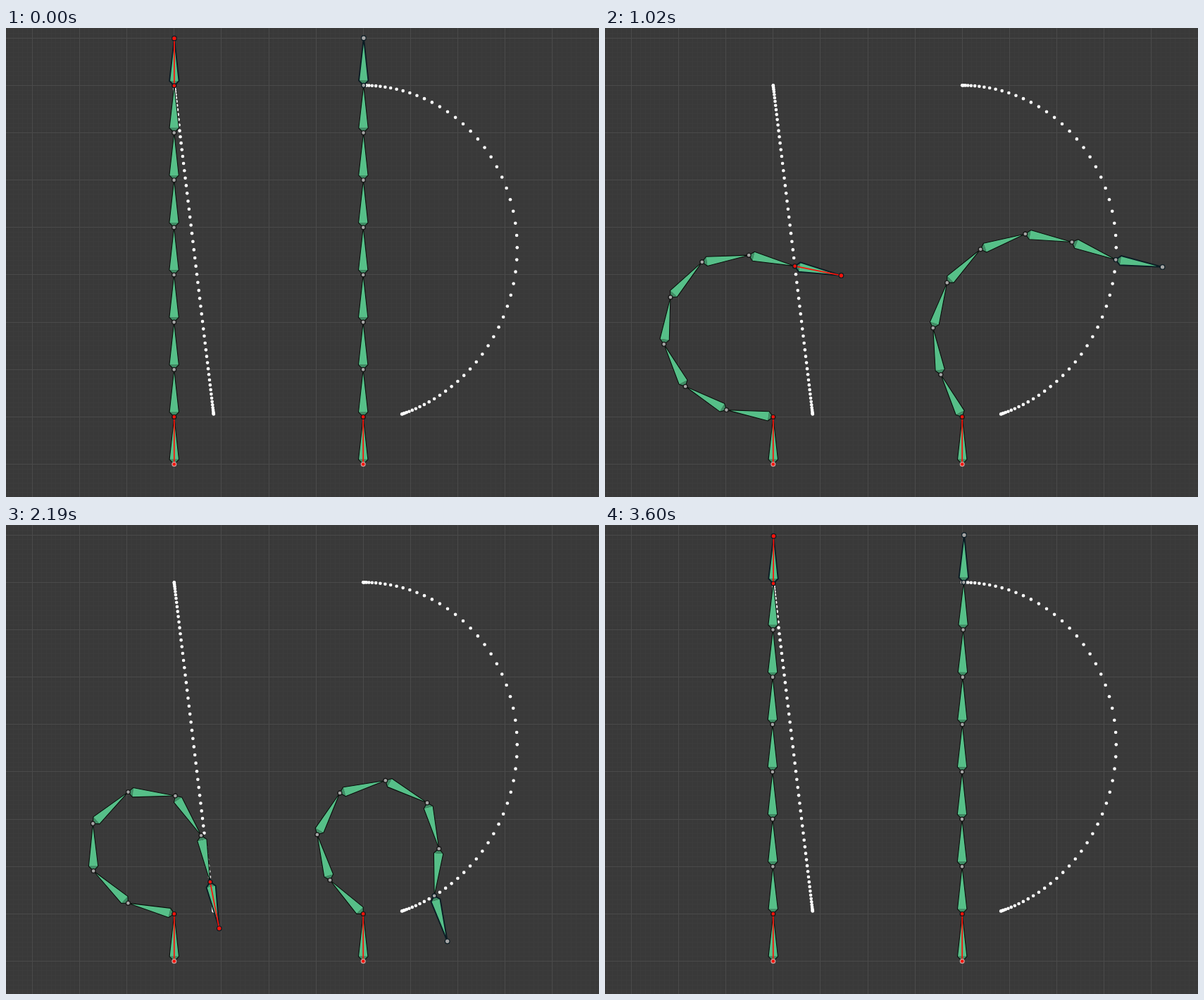
An HTML page with a canvas for the animation above (3630 ms loop, 842 by 665 pixels).

```html
<!DOCTYPE html>
<html>
<head>
<meta charset="utf-8">
<style>
html, body { margin: 0; overflow: hidden; background: #393939; }
canvas { display: block; }
</style>
</head>
<body>
<canvas id="stage" width="842" height="665"></canvas>
<script>
const ctx = document.getElementById('stage').getContext('2d');
const UNIT = 67.15, BASE_Y = 551.4, LEFT_X = 238.8, RIGHT_X = 507.2;
const STEP = 30, FRAMES = 121, HALF = 60;
const RED = '#f8140c', GREY = '#a6a6a6';

// Final local joint turns in degrees; the last one belongs to the tip bone.
const TURNS = [-48.8, 31.6, 48.6, 50.4, 47.5, 52, 22, -23.8];
// How the extra bend of the IK chain spreads over its joints, start and end.
const SPREAD_A = [0, 8, 9, 7, 8, 9, 19];
const SPREAD_B = [0, 3, 8, 11, 12, 19, 7];

const rad = deg => deg * Math.PI / 180;
const ease = u => u * u * (3 - 2 * u);

// Normalised quaternion blend from 0 to deg.
function turn(deg, s) {
  const h = rad(deg) / 2;
  return 2 * Math.atan2(s * Math.sin(h), 1 - s + s * Math.cos(h));
}

const step = ([x, y], angle) => [x + UNIT * Math.sin(angle), y - UNIT * Math.cos(angle)];

function chain(x, turns, angle = 0) {
  const points = [[x, BASE_Y]];
  for (const t of turns) points.push(step(points[points.length - 1], angle += t));
  return points;
}

const forward = s => chain(RIGHT_X, TURNS.map(d => turn(d, s)));
const target = s => [LEFT_X + 56 * s, 81.4 + 466 * s];

function inverse(s) {
  const [tx, ty] = target(s), dx = tx - LEFT_X, dy = ty - BASE_Y;
  const build = (k, angle) => chain(LEFT_X, SPREAD_A.map((a, i) =>
    turn(TURNS[i], s) + rad(k * (a + (SPREAD_B[i] - a) * s))), angle);
  const reach = k => {
    const [x, y] = build(k)[7];
    return [x - LEFT_X, y - BASE_Y];
  };
  let lo = 0, hi = 2;
  // A nearly straight chain stays unsolved and is only aimed.
  if (s < 0.008) hi = 0;
  else for (let i = 0; i < 30; i++) {
    const k = (lo + hi) / 2;
    if (Math.hypot(...reach(k)) > Math.hypot(dx, dy)) lo = k; else hi = k;
  }
  const [ex, ey] = reach(hi);
  return build(hi, Math.atan2(dy, dx) - Math.atan2(ey, ex));
}

function grid(gap, color) {
  ctx.strokeStyle = color;
  ctx.lineWidth = 1;
  ctx.beginPath();
  for (let x = LEFT_X % gap; x < 842; x += gap) {
    const p = Math.floor(x) + 0.5;
    ctx.moveTo(p, 0); ctx.lineTo(p, 665);
  }
  for (let y = BASE_Y % gap; y < 665; y += gap) {
    const p = Math.floor(y) + 0.5;
    ctx.moveTo(0, p); ctx.lineTo(842, p);
  }
  ctx.stroke();
}

function dot([x, y], r, fill, outline) {
  ctx.beginPath();
  ctx.arc(x, y, r, 0, 2 * Math.PI);
  ctx.fillStyle = fill;
  ctx.fill();
  if (outline) {
    ctx.strokeStyle = outline;
    ctx.lineWidth = 1.2;
    ctx.stroke();
  }
}

function shape(points, fill) {
  ctx.beginPath();
  for (const p of points) ctx.lineTo(...p);
  ctx.closePath();
  if (fill) { ctx.fillStyle = fill; ctx.fill(); }
  else ctx.stroke();
}

function bone(head, tail, { red = false, tip = false } = {}) {
  const dx = (tail[0] - head[0]) / 10, dy = (tail[1] - head[1]) / 10;
  const a = [head[0] + dx - dy, head[1] + dy + dx];
  const b = [head[0] + dx + dy, head[1] + dy - dx];
  shape([a, tail, b], '#56bf88');
  shape([a, head, b], '#3f8d65');
  ctx.lineJoin = 'round';
  ctx.strokeStyle = tip ? '#0b1c24' : '#0a0f0c';
  ctx.lineWidth = tip ? 1.9 : 1.1;
  shape([a, tail, b, head]);
  if (red) {
    ctx.strokeStyle = RED;
    ctx.lineWidth = 1.8;
    shape([head, tail]);
  }
  const edge = tip ? '#0b1c24' : '#181818';
  dot(head, 2.9, red ? RED : GREY, red && !tip ? '#c9a09c' : edge);
  dot(tail, tip ? 3.3 : 2.9, red ? RED : GREY, edge);
}

function draw(s) {
  ctx.fillStyle = '#393939';
  ctx.fillRect(0, 0, 842, 665);
  grid(UNIT / 10, '#3c3c3c');
  grid(UNIT, '#4a4a4a');
  for (let i = 0; i <= HALF; i++) {
    const p = ease(i / HALF);
    dot(target(p), 2.3, '#fff');
    dot(forward(p)[7], 2.3, '#fff');
  }
  const left = inverse(s), right = forward(s), goal = target(s);
  for (let i = 0; i < 7; i++) {
    bone(left[i], left[i + 1]);
    bone(right[i], right[i + 1]);
  }
  for (const x of [LEFT_X, RIGHT_X])
    bone([x, BASE_Y + UNIT], [x, BASE_Y], { red: true });
  bone(goal, step(goal, turn(180, s)), { red: true, tip: true });
  bone(right[7], right[8], { tip: true });
}

function tick() {
  const frame = Math.floor(performance.now() / STEP) % FRAMES;
  const phase = (frame + FRAMES - 2) % FRAMES;
  draw(ease(1 - Math.abs(phase - HALF) / HALF));
  requestAnimationFrame(tick);
}
tick();
</script>
</body>
</html>
```
